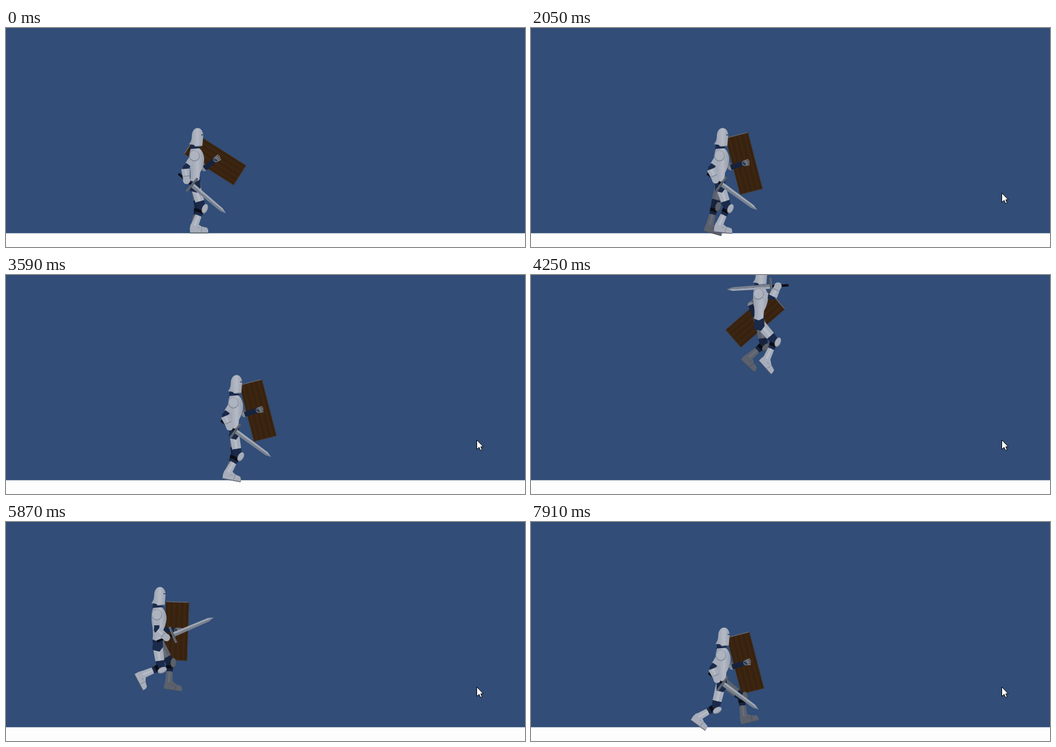
An HTML page with a canvas that plays this animation: 888x375 px, repeating every 7.99 s.

```html
<!DOCTYPE html>
<html lang="en">
<head>
<meta charset="utf-8">
<title>Knight</title>
<style>
html, body { margin: 0; width: 100%; height: 100%; overflow: hidden; background: #314d78; }
canvas { display: block; width: 888px; height: 375px; }
</style>
</head>
<body>
<canvas id="stage" width="888" height="375"></canvas>
<script>
const ctx = document.getElementById('stage').getContext('2d');
const LOOP = 7990, STEP = 73.3, START = 1460;
const GROUND = 352, HOME = 328;
const SPEED = .28, STRIDE = 154, MARCH = .0046;
const NAVY = '#1b2a4a', BLACK = '#0b0d14';
const NEAR = { plate: '#a7adba', shade: '#808897', light: '#b6bcc7', cloth: NAVY };
const FAR = { plate: '#5b616c', shade: '#484e58', light: '#676d78', cloth: '#17233d' };

// Points are relative to the head's middle at ground level; feet are ankle x, y and tilt
const STAND = { hand: [-19, -91], blade: 40, shield: [30, -126.5], tilt: 32.4, drop: 0, near: [-6, -12, 0], far: [-6, -12, 0] };
const SWING = { hand: [11, -94], blade: -23, shield: [28, -105], tilt: 92, drop: 1, near: [-31, -29, 62], far: [15, -15, 8] };
const AIR = { hand: [28, -147], blade: 176, shield: [-11, -89.5], tilt: 139, drop: 1, near: [8, -20, 48], far: [-23, -23, 43] };

// Start, end and direction; 0 marches on the spot
const MOVES = [
  [1663, 2594, 0], [2594, 2886, -1], [2886, 3416, 1], [4770, 4970, 0],
  [4970, 5648, -1], [5648, 6905, 1], [6905, 7102, 0], [7102, LOOP, -1]
];
const JUMPS = [4210, 6334];

const lerp = (a, b, k) => a + (b - a) * k;
const mix = (p, q, k) => p.map((v, i) => lerp(v, q[i], k));
const clamp = (v, lo, hi) => Math.min(hi, Math.max(lo, v));
const ramp = (t, from, to) => clamp((t - from) / (to - from), 0, 1);
const turn = (a, b, k) => a + ((((b - a) % 360) + 540) % 360 - 180) * k;

function blend(a, b, k) {
  const pose = {};
  for (const key in a) pose[key] = (Array.isArray(a[key]) ? mix : turn)(a[key], b[key], k);
  return pose;
}

function travel(t) {
  let x = HOME, gait = Math.PI;
  for (const [from, to, dir] of MOVES) {
    const time = clamp(t - from, 0, to - from);
    x += dir * SPEED * time;
    gait += time * (dir ? -dir * SPEED * 2 * Math.PI / STRIDE : MARCH);
  }
  return { x, gait };
}

function stepFoot(gait) {
  const c = Math.cos(gait);
  return [-10 + 5 * Math.cos(2 * gait) + 41 * c, -13 - 5 * c * c, 11 - 26 * c];
}

function walkPose(gait) {
  return {
    hand: [-12, -92], blade: 36, shield: [36.5, -120], tilt: 75.5,
    drop: 11 * Math.cos(gait) ** 4,
    near: stepFoot(gait), far: stepFoot(gait + Math.PI)
  };
}

function poseAt(t, gait) {
  let pose = blend(STAND, walkPose(gait), ramp(t, START, START + 140));
  for (const apex of JUMPS) {
    const u = t - apex;
    const jump = blend(SWING, AIR, ramp(u, -476, -254));
    pose = blend(pose, jump, ramp(u, -575, -476) * (1 - ramp(u, 560, 780)));
  }
  return pose;
}

// Middle joint of a two-part limb; side tells which way it bends
function joint(a, b, upper, lower, side) {
  const dx = b[0] - a[0], dy = b[1] - a[1], d = Math.hypot(dx, dy);
  const along = (upper ** 2 - lower ** 2 + d * d) / (2 * d);
  const out = side * Math.sqrt(Math.max(0, upper ** 2 - along ** 2));
  return [a[0] + (dx * along - dy * out) / d, a[1] + (dy * along + dx * out) / d];
}

function poly(points, fill) {
  ctx.beginPath();
  points.forEach(([x, y]) => ctx.lineTo(x, y));
  ctx.closePath();
  ctx.fillStyle = fill;
  ctx.fill();
}

function oval(x, y, rx, ry, angle, fill) {
  ctx.beginPath();
  ctx.ellipse(x, y, rx, ry, angle, 0, 7);
  ctx.fillStyle = fill;
  ctx.fill();
}

function line(a, b, width, color) {
  ctx.beginPath();
  ctx.moveTo(...a);
  ctx.lineTo(...b);
  ctx.lineWidth = width;
  ctx.strokeStyle = color;
  ctx.stroke();
}

function limb(a, b, w1, w2, fill) {
  const dx = b[0] - a[0], dy = b[1] - a[1], len = Math.hypot(dx, dy) || 1;
  const nx = dy / len / 2, ny = -dx / len / 2;
  poly([[a[0] + nx * w1, a[1] + ny * w1], [b[0] + nx * w2, b[1] + ny * w2],
    [b[0] - nx * w2, b[1] - ny * w2], [a[0] - nx * w1, a[1] - ny * w1]], fill);
}

function placed(x, y, deg, draw) {
  ctx.save();
  ctx.translate(x, y);
  ctx.rotate(deg * Math.PI / 180);
  draw();
  ctx.restore();
}

function shoe(c) {
  poly([[-6, -4], [5, -5], [13, 0], [22, 2], [24, 6], [24, 11], [-7, 11], [-7.5, 3]], c.plate);
  line([-6, 2], [9, 2], 1, c.shade);
  line([13, 1], [12, 10], 1, c.shade);
  line([-7, 10.8], [24, 10.8], 1, '#4a505b');
}

function leg(hip, [ax, ay, tilt], c) {
  const ankle = [ax, ay], knee = joint(hip, ankle, 42, 35, -1);
  const on = k => mix(knee, ankle, k);
  const low = mix(hip, knee, .74);
  const angle = Math.atan2(ay - knee[1], ax - knee[0]) - Math.PI / 2;
  limb(hip, low, 17, 15.5, c.plate);
  limb(mix(hip, low, .1), low, 5, 4, c.light);
  limb(low, knee, 15.5, 13, c.cloth);
  oval(...knee, 6.6, 6.6, 0, c.cloth);
  limb(knee, on(.5), 13, 11, c.cloth);
  limb(on(.12), on(.28), 13, 12, BLACK);
  placed(ax, ay, tilt, () => shoe(c));
  limb(on(.42), ankle, 11, 13, c.plate);
  oval(ax, ay, 6, 5, 0, c.plate);
  limb(on(.42), on(.95), 3, 4, c.light);
  const px = knee[0] + Math.cos(angle) * 6, py = knee[1] + Math.sin(angle) * 6;
  oval(px, py, 5, 8.5, angle, c.shade);
  oval(px, py - .8, 4.2, 7.5, angle, c.plate);
}

function shield() {
  ctx.fillStyle = '#372210';
  ctx.fillRect(-50, -20, 100, 40);
  ctx.fillStyle = '#3d2611';
  for (let y = -15; y < 16; y += 9) ctx.fillRect(-50, y, 100, 4);
  ctx.lineWidth = 1;
  ctx.strokeStyle = '#45413f';
  ctx.strokeRect(-50, -20, 100, 40);
  line([-50, -19], [-50, 19], 1.4, '#626872');
}

function sword() {
  line([-18, 0], [10, 0], 4, BLACK);
  poly([[11, -4], [78, -3.2], [88, 0], [11, 0]], '#a0a7b3');
  poly([[11, 4], [78, 3.2], [88, 0], [11, 0]], '#7a818e');
  line([12, -15], [12, 15], 4, '#565c66');
  line([11, -14], [11, 14], 1, '#6f7681');
}

function farArm(hand) {
  const shoulder = [-2, -130], elbow = joint(shoulder, hand, 23, 26, 1);
  limb(shoulder, elbow, 10, 10, FAR.plate);
  oval(...elbow, 5, 5, 0, '#7f8693');
  limb(elbow, mix(elbow, hand, .8), 9, 9, FAR.cloth);
  const deg = Math.atan2(hand[1] - elbow[1], hand[0] - elbow[0]) * 180 / Math.PI;
  placed(...hand, deg, () => {
    oval(-1, 0, 5, 5, 0, '#59606c');
    for (let i = -1; i <= 2; i++) line([0, i * 2.6 - 1], [8 - Math.abs(i), i * 3 - 1], 2, '#737a85');
    line([-4, -2], [0, 3], 2, NAVY);
  });
}

function nearArm(hand) {
  const shoulder = [-6, -132], elbow = joint(shoulder, hand, 25, 21, 1);
  const on = k => mix(elbow, hand, k);
  limb(shoulder, mix(shoulder, elbow, .72), 13, 11, NEAR.plate);
  limb(mix(shoulder, elbow, .68), elbow, 9, 9, NAVY);
  oval(...elbow, 5, 5, 0, NAVY);
  limb(on(.05), hand, 15, 11, NEAR.plate);
  limb(on(.1), on(.6), 4, 3, NEAR.light);
  oval(...hand, 6.3, 6.3, 0, NEAR.plate);
  limb(on(.62), on(.68), 12, 12, NEAR.shade);
  oval(-5.5, -133, 9, 9.5, 0, NEAR.shade);
  oval(-5.5, -133.5, 8, 8.5, 0, '#adb3bf');
}

function steel() {
  const g = ctx.createLinearGradient(-15, 0, 12, 0);
  g.addColorStop(0, '#959caa');
  g.addColorStop(.55, '#b5bac6');
  g.addColorStop(1, '#929aa8');
  return g;
}

function torso() {
  poly([[-13, -99], [4, -99], [5, -78], [-1, -70], [-13, -73]], NAVY);
  poly([[-12, -153], [4, -153], [4, -143], [-13, -143]], NAVY);
  ctx.beginPath();
  ctx.moveTo(-12, -145);
  ctx.lineTo(3, -146);
  ctx.bezierCurveTo(8, -142, 12, -133, 11, -125);
  ctx.quadraticCurveTo(10, -115, 4, -104);
  ctx.lineTo(3, -92);
  ctx.lineTo(-5, -88);
  ctx.lineTo(-13, -91);
  ctx.quadraticCurveTo(-11, -104, -14, -118);
  ctx.quadraticCurveTo(-16, -134, -12, -145);
  ctx.fillStyle = steel();
  ctx.fill();
}

function helmet() {
  ctx.beginPath();
  ctx.moveTo(-15, -153);
  ctx.quadraticCurveTo(-10, -158, -10, -168);
  ctx.bezierCurveTo(-9, -185, 9, -185, 9.5, -168);
  ctx.lineTo(8, -150);
  ctx.lineTo(-4, -149);
  ctx.lineTo(-7, -152);
  ctx.closePath();
  ctx.fillStyle = steel();
  ctx.fill();
  line([-4, -149.5], [8, -150.5], 1, NEAR.shade);
  line([6, -169], [9.5, -169], 1.4, '#27324a');
}

function knight(x, lift, pose) {
  const { hand, blade, tilt, drop, near, far } = pose;
  const body = draw => placed(0, drop, 0, draw);
  placed(x, GROUND - lift, 0, () => {
    body(() => {
      placed(...pose.shield, tilt, shield);
      farArm([pose.shield[0] + 2, pose.shield[1] - 1]);
    });
    leg([-3, -88 + drop], far, FAR);
    leg([-5, -85 + drop], near, NEAR);
    body(() => {
      torso();
      helmet();
      placed(...hand, blade, sword);
      nearArm(hand);
    });
  });
}

function cursor(t) {
  if (t < START) return;
  const k = ramp(t, START, START + 300);
  placed(lerp(862, 805.5, k), lerp(300, 282.5, k), 0, () => {
    poly([[0, 0], [0, 16], [4, 12.5], [6.5, 18], [9, 17], [6.8, 11.5], [11, 11.5]], '#fff');
    ctx.lineWidth = 1;
    ctx.strokeStyle = '#000';
    ctx.stroke();
  });
}

function render(t) {
  const { x, gait } = travel(t);
  const lift = Math.max(0, ...JUMPS.map(apex => 188 - 5.6e-4 * (t - apex) ** 2));
  ctx.fillStyle = '#314d78';
  ctx.fillRect(0, 0, 888, 375);
  ctx.fillStyle = '#a3b0c3';
  ctx.fillRect(0, 351, 888, 1);
  ctx.fillStyle = '#fdfdfd';
  ctx.fillRect(0, 352, 888, 23);
  knight(x, lift, poseAt(t, gait));
  cursor(t);
}

// The picture moves in even steps after a long hold
function stepped(t) {
  return t < START ? 0 : START + Math.floor((t - START) / STEP + .2) * STEP;
}

const begin = performance.now();
function tick() {
  render(stepped((performance.now() - begin) % LOOP));
  requestAnimationFrame(tick);
}
tick();
</script>
</body>
</html>
```
